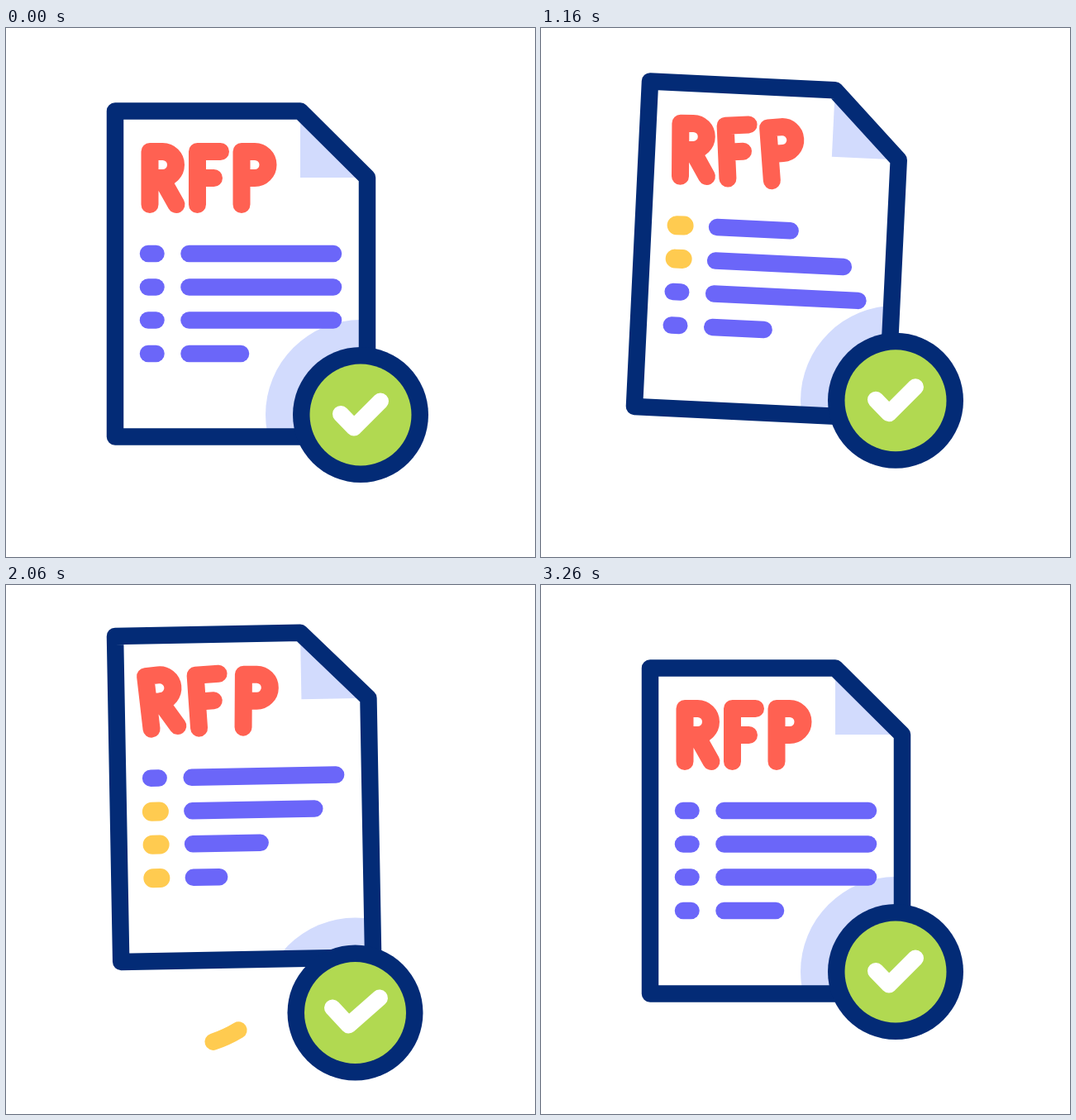
Animation, 640 px wide and 640 px high, one loop 3.6 s. Source, as an HTML page with a canvas:

```html
<!DOCTYPE html>
<html lang="en">
<head>
<meta charset="utf-8">
<title>RFP document</title>
<style>
html, body { margin: 0; width: 100%; height: 100%; overflow: hidden; background: #fff; }
canvas { display: block; width: 640px; height: 640px; }
</style>
</head>
<body>
<canvas width="640" height="640"></canvas>
<script>
const ctx = document.querySelector('canvas').getContext('2d');
const LOOP = 3600;
const NAVY = '#032b76', RED = '#ff6152', PURPLE = '#6b66f9';
const YELLOW = '#ffcb50', GREEN = '#b1d951', PALE = '#d2dbfd';
const RAD = Math.PI / 180;

// Keys are [time, value] pairs, joined by a sine ease.
const pageY = [[300, 0], [1030, -46], [1490, 7], [2100, -39], [3020, 0]];
const pageTurn = [[660, 0], [1270, 3], [1900, -2], [2460, 3], [3160, 0]];
const letterTurn = [[300, 0], [920, -7], [1540, 7], [2220, -7.5], [2980, 0]];
const badgeY = [[300, 0], [970, -38], [1560, 49.5], [2460, 49.5], [2990, 0]];
const tickSwing = [[1380, 0], [1550, .7], [1780, -1], [2060, 1], [2420, -1], [2760, 0]];

const rows = [
  { y: 273, keys: [[655, 195], [1020, 100], [1720, 195]] },
  { y: 313.5, keys: [[1040, 195], [1420, 110], [2450, 195]] },
  { y: 353.5, keys: [[1330, 195], [2000, 100], [2647, 195]] },
  { y: 394, keys: [[1700, 83], [2200, 45], [2800, 83]] }
];

const letters = [
  { x: 174, delay: 0, path: new Path2D('M0 0V-64H15.5a16 16 0 0 1 0 32H0M14 -32L32 0') },
  { x: 231.5, delay: 100, path: new Path2D('M0 0V-64H28M0 -32H20') },
  { x: 285, delay: 230, path: new Path2D('M0 0V-64H16a16 16 0 0 1 0 32H0') }
];

const tick = {
  rest: [-24, -1, -8, 15.5, 24, -16.5],
  big: [-27.5, -6, -8, 15, 29.5, -18],
  small: [-18, 9, -6, 17.5, 11.5, -8.5]
};

const sheet = new Path2D('M132 100.5H356L437 181V494.5H132Z');

const unit = (t, from, to) => Math.min(1, Math.max(0, (t - from) / (to - from)));
const sine = p => (1 - Math.cos(Math.PI * p)) / 2;
const easeOut = p => 1 - (1 - p) ** 2;
const mix = (a, b, p) => a + (b - a) * p;

function value(keys, t) {
  const i = keys.findIndex(k => k[0] > t);
  if (i === 0) return keys[0][1];
  if (i < 0) return keys[keys.length - 1][1];
  const [t0, a] = keys[i - 1], [t1, b] = keys[i];
  return mix(a, b, sine(unit(t, t0, t1)));
}

function stroke(color, width, path) {
  ctx.strokeStyle = color;
  ctx.lineWidth = width;
  path ? ctx.stroke(path) : ctx.stroke();
}

function line(points, color, width) {
  ctx.beginPath();
  for (let i = 0; i < points.length; i += 2) ctx.lineTo(points[i], points[i + 1]);
  stroke(color, width);
}

function disc(x, y, r, color) {
  ctx.beginPath();
  ctx.arc(x, y, r, 0, 7);
  ctx.fillStyle = color;
  ctx.fill();
}

// Arc from angle a to b, in degrees, while the tail has not caught the head.
function swoosh(x, y, a, b) {
  if (Math.abs(b - a) < .5) return;
  ctx.beginPath();
  ctx.arc(x, y, 158, a * RAD, b * RAD, b < a);
  stroke(YELLOW, 20.5);
}

function drawSwooshes(t) {
  const head = easeOut(unit(t, 1380, 1900)), tail = sine(unit(t, 1800, 2130));
  swoosh(200, 403, mix(177, 59, tail), mix(177, 59, head));
  const head2 = easeOut(unit(t, 2480, 3080)), tail2 = sine(unit(t, 2800, 3220));
  swoosh(407, 238, mix(-75, 0, tail2), mix(-75, 0, head2));
}

function drawRow(row, i, t) {
  const on = 620 + 360 * i, off = on + 1140;
  const glow = sine(unit(t, on, on + 140)) - sine(unit(t, off, off + 140));
  line([172, row.y, 181.5, row.y], PURPLE, 20.5);
  ctx.globalAlpha = glow;
  line([172.5, row.y, 181.5, row.y], YELLOW, mix(20.5, 23, glow));
  ctx.globalAlpha = 1;
  line([221.5, row.y, 201 + value(row.keys, t), row.y], PURPLE, 20.5);
}

function drawPage(t, bx, by) {
  ctx.save();
  ctx.translate(132, 100.5 + value(pageY, t));
  ctx.rotate(value(pageTurn, t) * RAD);
  ctx.translate(-132, -100.5);
  ctx.fillStyle = '#fff';
  ctx.fill(sheet);

  // The badge shadow stays upright under the badge, cut by the sheet.
  const turned = ctx.getTransform();
  ctx.save();
  ctx.clip(sheet);
  ctx.resetTransform();
  disc(bx, by, 115, PALE);
  ctx.setTransform(turned);
  ctx.fill(new Path2D('M356 100V181H437Z'));
  ctx.restore();

  stroke(NAVY, 20.5, sheet);
  rows.forEach((row, i) => drawRow(row, i, t));
  for (const { x, delay, path } of letters) {
    ctx.save();
    ctx.translate(x, 213.5);
    ctx.rotate(value(letterTurn, t - delay) * RAD);
    stroke(RED, 21, path);
    ctx.restore();
  }
  ctx.restore();
}

function drawBadge(x, y, swing) {
  const pose = swing > 0 ? tick.big : tick.small;
  disc(x, y, 82, NAVY);
  disc(x, y, 61.5, GREEN);
  const points = tick.rest.map((p, i) => mix(p, pose[i], Math.abs(swing)) + (i % 2 ? y : x));
  line(points, '#fff', 20);
}

function draw(now) {
  const t = now % LOOP;
  const swing = value(tickSwing, t);
  const x = 429 - swing * (swing > 0 ? 6.5 : 8);
  const y = 468 + value(badgeY, t);
  ctx.fillStyle = '#fff';
  ctx.fillRect(0, 0, 640, 640);
  ctx.lineCap = ctx.lineJoin = 'round';
  drawSwooshes(t);
  drawPage(t, x, y);
  drawBadge(x, y, swing);
  requestAnimationFrame(draw);
}
requestAnimationFrame(draw);
</script>
</body>
</html>
```
